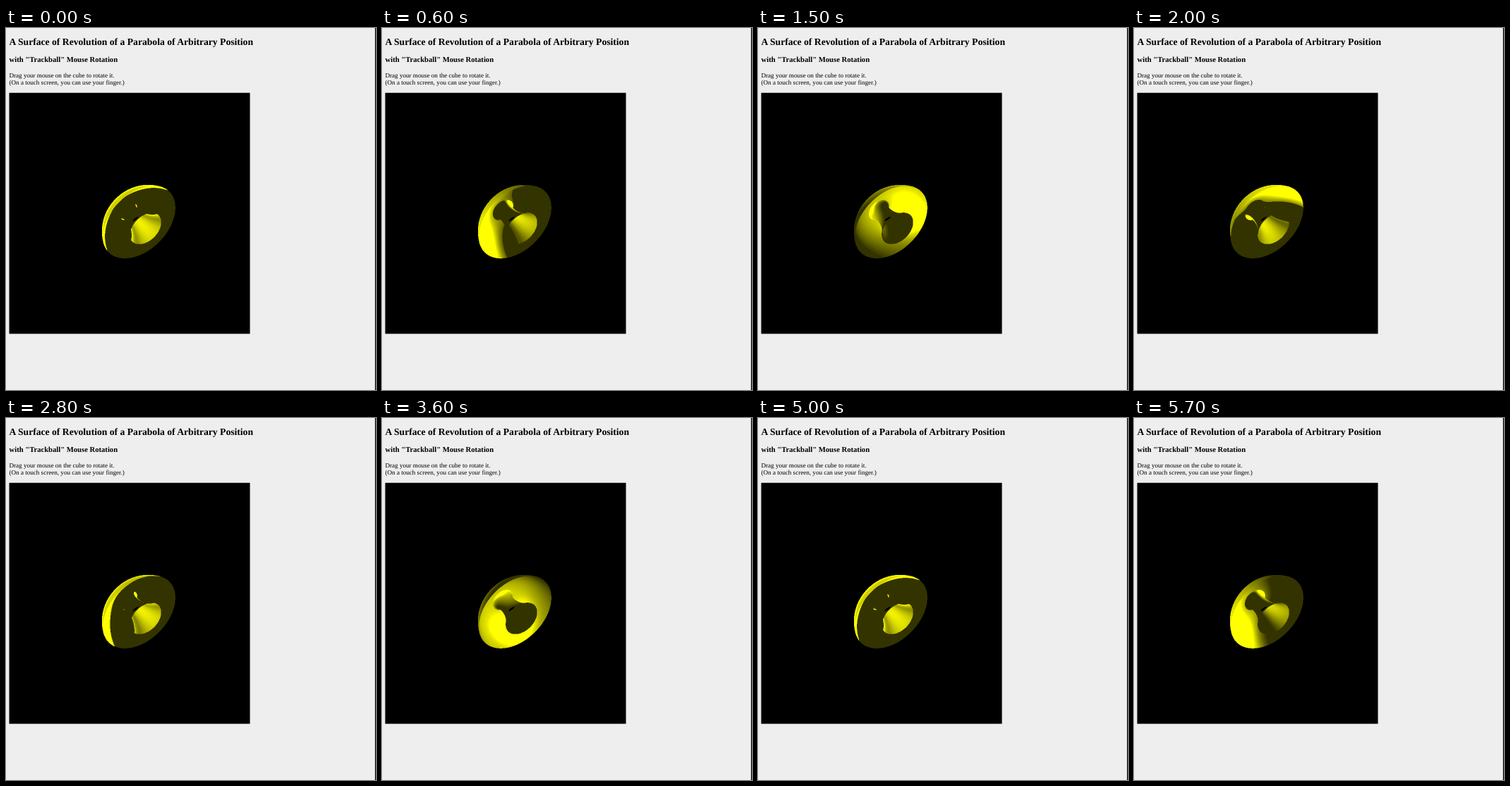
An HTML page with a canvas for the animation above (5.8 s loop, 524 by 512 pixels).

```html
<!DOCTYPE html>
<html lang="en">
<head>
<meta charset="utf-8">
<title>Surface of Revolution</title>
<style>
  html, body { margin: 0; width: 524px; height: 512px; overflow: hidden; background: #eee; }
  svg, canvas { position: absolute; display: block; }
  svg { left: 0; top: 0; }
  canvas { left: 130px; top: 217px; width: 110px; height: 110px; }
  text { font-family: "Liberation Serif", Times, serif; text-rendering: geometricPrecision; }
</style>
</head>
<body>
<svg width="524" height="512" viewBox="0 0 524 512">
  <rect x="522.7" width="1.3" height="512"/>
  <rect x="4.5" y="91.7" width="341" height="340.8"/>
  <text x="4.5" y="24" font-size="13.64" font-weight="bold">A Surface of Revolution of a Parabola of Arbitrary Position</text>
  <text x="4.5" y="48.2" font-size="10.64" font-weight="bold">with "Trackball" Mouse Rotation</text>
  <text x="4.5" y="70" font-size="9.09">Drag your mouse on the cube to rotate it.</text>
  <text x="4.5" y="80.2" font-size="9.09">(On a touch screen, you can use your finger.)</text>
</svg>
<canvas id="view" width="220" height="220"></canvas>
<script>
const LOOP = 5800, STEP = 100, ORBIT = 2500;
const SIZE = 220, SCALE = 2, CX = 55.5, CY = 54.5;
const COS = 0.66, SIN = 0.751, DIAG = Math.SQRT1_2;

// Profile pieces as cubic curves of [radius, height along the axis]
const HUB = [[26, 22.5], [9, 2], [9, -25], [17, -27]];
const DISH = [[17, -27], [37.7, -25.7], [52.2, -14.9], [60.5, 5.3]];

const ctx = document.getElementById("view").getContext("2d");
const image = ctx.createImageData(SIZE, SIZE);
const depth = new Float32Array(SIZE * SIZE).fill(-Infinity);
const normals = new Float32Array(SIZE * SIZE * 3);

function cubic(p, s, k) {
  const q = 1 - s;
  return q * q * q * p[0][k] + 3 * q * q * s * p[1][k] + 3 * q * s * s * p[2][k] + s * s * s * p[3][k];
}

function slope(p, s, k) {
  const q = 1 - s;
  return q * q * (p[1][k] - p[0][k]) + 2 * q * s * (p[2][k] - p[1][k]) + s * s * (p[3][k] - p[2][k]);
}

// Revolve a profile and keep the nearest normal for every pixel
function revolve(profile) {
  const rows = 360, turns = 1200;
  for (let i = 0; i <= rows; i++) {
    const s = i / rows;
    const r = cubic(profile, s, 0), z = cubic(profile, s, 1);
    const dr = slope(profile, s, 0), dz = slope(profile, s, 1);
    const len = Math.hypot(dr, dz);
    for (let j = 0; j < turns; j++) {
      const a = j / turns * 2 * Math.PI;
      const ca = Math.cos(a), sa = Math.sin(a);
      const across = r * ca, along = z * SIN + r * sa * COS;
      const x = Math.floor((CX + (across + along) * DIAG) * SCALE);
      const y = Math.floor((CY + (along - across) * DIAG) * SCALE);
      const near = z * COS - r * sa * SIN;
      const at = y * SIZE + x;
      if (near <= depth[at]) continue;
      depth[at] = near;
      normals[at * 3] = -dz / len * ca;
      normals[at * 3 + 1] = -dz / len * sa;
      normals[at * 3 + 2] = dr / len;
    }
  }
}

function lightAt(time) {
  const a = time / ORBIT * 2 * Math.PI;
  const v = [Math.sin(a), 1 + 1.5 * Math.cos(a), 0.15 - 0.7 * Math.cos(a)];
  const len = Math.hypot(...v);
  return v.map(c => c / len);
}

function draw(time) {
  const [lx, ly, lz] = lightAt(time);
  const lightView = lz * COS - ly * SIN;
  const data = image.data;
  for (let i = 0; i < depth.length; i++) {
    if (depth[i] === -Infinity) continue;
    const nx = normals[i * 3], ny = normals[i * 3 + 1], nz = normals[i * 3 + 2];
    const facing = nx * lx + ny * ly + nz * lz;
    let glow = 0.2;
    if (facing > 0) {
      const shine = Math.max(0, 2 * facing * (nz * COS - ny * SIN) - lightView);
      glow += 0.75 * facing + 1.2 * shine ** 3;
    }
    data[i * 4] = data[i * 4 + 1] = Math.min(255, 255 * glow);
    data[i * 4 + 3] = 255;
  }
  ctx.putImageData(image, 0, 0);
  // Narrow gap at the throat
  ctx.beginPath();
  ctx.ellipse(107, 106, 10, 2.6, -0.62, 0, 2 * Math.PI);
  ctx.fill();
}

revolve(HUB);
revolve(DISH);

const start = performance.now();
let shown = -1;
function tick() {
  const time = (performance.now() - start) % LOOP;
  const step = Math.floor(time / STEP);
  if (step !== shown) {
    shown = step;
    draw(step * STEP);
  }
  requestAnimationFrame(tick);
}
tick();
</script>
</body>
</html>
```
